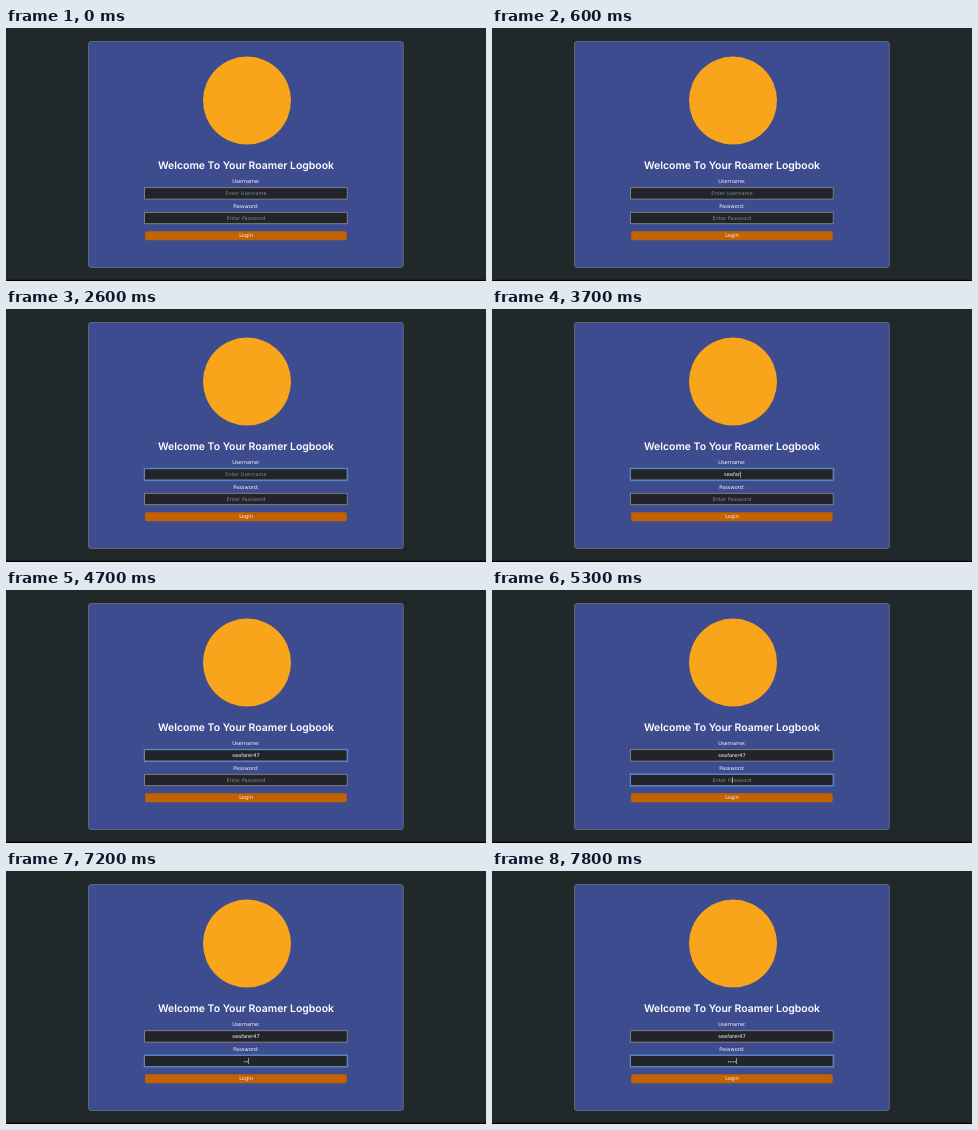
Recreate the animation shown at these times as an HTML page. Size 480 by 253 pixels, loop 8000 ms.

```html
<!DOCTYPE html>
<html lang="en">
<head>
<meta charset="utf-8">
<title>Login</title>
<style>
  html, body { margin: 0; height: 100%; overflow: hidden; background: #21282a; }
  svg { display: block; width: 100vw; height: 100vh; }
  text {
    font: 5.1px "DejaVu Sans", sans-serif; fill: #f4f5fa;
    text-anchor: middle; text-rendering: geometricPrecision;
  }
  .title { font: 600 10.45px Inter, sans-serif; fill: #fff; }
  .hint { fill: #7f8488; }
  .secret { font: 500 4.1px Inter, sans-serif; }
  .box { fill: #212529; stroke: #948b88; stroke-width: .8; }
  .ring { fill: none; stroke: #3560b3; stroke-width: 2; }
  .edge { fill: none; stroke: #6089c6; stroke-width: .8; }
  .caret { fill: #e4e6e8; }
</style>
</head>
<body>
<svg viewBox="0 0 480 253" preserveAspectRatio="none">
  <rect width="480" height="253" fill="#21282a"/>
  <rect y="251.8" width="480" height="1.2" fill="#000"/>
  <rect x="82.5" y="13.5" width="314.8" height="226" rx="2.5" fill="#3d4c8f" stroke="#6c7182" stroke-width=".8"/>
  <circle cx="241" cy="72.6" r="44" fill="#f9a51c"/>
  <text class="title" x="240" y="140.6">Welcome To Your Roamer Logbook</text>
  <text x="240" y="155">Username:</text>
  <text x="240" y="179.5">Password:</text>
  <g id="fields"></g>
  <rect x="139.1" y="203.2" width="201.6" height="9" rx="1.6" fill="#c26200"/>
  <text x="240" y="209.4">Login</text>
</svg>
<script>
const LOOP = 8000, CENTER = 240, FADE = 150;
const caretTimes = [[2900, 4700], [5100, 5600], [6100, 6600], [7000, LOOP]];

const fieldSpecs = [
  { top: 159.7, hint: 'Enter Username', value: 'seafarer47', style: '', focus: [2300, 5100],
    keys: [3300, 3400, 3500, 3550, 3600, 3700, 3900, 4100, 4200, 4300] },
  { top: 184.3, hint: 'Enter Password', value: '••••', style: 'secret', focus: [5100, LOOP + FADE],
    keys: [7000, 7200, 7500, 7800] }
];

function add(tag, attrs, content = '') {
  const node = document.createElementNS('http://www.w3.org/2000/svg', tag);
  for (const name in attrs) node.setAttribute(name, attrs[name]);
  node.textContent = content;
  return document.getElementById('fields').appendChild(node);
}

function makeField(spec) {
  const y = spec.top;
  const frame = (className, grow = 0) => add('rect', {
    class: className, x: 138.6 - grow, y: y - grow,
    width: 202.6 + 2 * grow, height: 11.4 + 2 * grow, rx: grow
  });
  const ring = frame('ring', .5);
  frame('box');
  const edge = frame('edge');
  const hint = add('text', { class: 'hint', x: CENTER, y: y + 7.6 }, spec.hint);
  const text = add('text', { class: spec.style, x: CENTER, y: y + 7.6 });
  const caret = add('rect', { class: 'caret', y: y + 2.7, width: .6, height: 6.2 });
  return { ...spec, ring, edge, hint, text, caret };
}

const fields = fieldSpecs.map(makeField);
const clamp = v => Math.max(0, Math.min(1, v));

function drawField(field, time) {
  const [start, end] = field.focus;
  const glow = clamp((time - start) / FADE) * (1 - clamp((time - end) / FADE));
  const typed = field.value.slice(0, field.keys.filter(key => key <= time).length);
  const focused = time >= start && time < end;
  const caretOn = focused && caretTimes.some(([on, off]) => time >= on && time < off);

  field.ring.style.opacity = field.edge.style.opacity = glow;
  field.hint.style.visibility = typed ? 'hidden' : 'visible';
  if (field.text.textContent !== typed) field.text.textContent = typed;
  const halfWidth = typed ? field.text.getComputedTextLength() / 2 : 0;
  field.caret.setAttribute('x', CENTER + halfWidth);
  field.caret.style.visibility = caretOn ? 'visible' : 'hidden';
}

function draw() {
  const time = performance.now() % LOOP;
  fields.forEach(field => drawField(field, time));
  requestAnimationFrame(draw);
}
draw();
</script>
</body>
</html>
```
